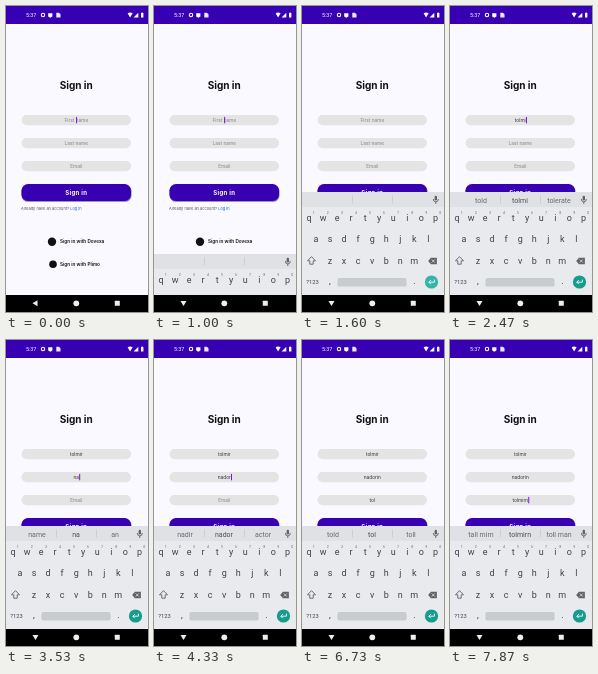
Animation, 142 px wide and 306 px high, one loop 8000 ms. Source, as an HTML page:

```html
<!DOCTYPE html>
<html lang="en">
<head>
<meta charset="utf-8">
<title>Sign in</title>
<style>
  html, body { margin: 0; width: 100%; height: 100%; overflow: hidden; background: #f9f9ff; }
  svg { display: block; width: 142px; height: 306px; }
  text { font-family: Inter, "Open Sans", sans-serif; text-anchor: middle; }
  .pill { fill: #e4e4e4; }
  .field { font-size: 4.8px; }
  .left { text-anchor: start; }
  .other { font-size: 4.7px; font-weight: 600; fill: #111; }
  .kb text { font-family: Roboto, sans-serif; fill: #3f4348; }
  .kb .key { font-size: 9px; }
  .kb .hint { font-size: 3.6px; fill: #6b6f74; }
  .kb .word { font-size: 7px; fill: #676b70; }
  .kb .mid { fill: #4b4f54; }
  .line { fill: none; stroke: #5f6368; stroke-width: .9; }
</style>
</head>
<body>
<svg viewBox="0 0 142 306">
  <rect width="142" height="306" fill="#f9f9ff"/>
  <rect width="142" height="18" fill="#3700b3"/>
  <g fill="#fff">
    <text x="20" y="11" class="left" style="font: 5.4px Roboto, sans-serif">5:37</text>
    <circle cx="37" cy="9" r="1.7" fill="none" stroke="#fff" stroke-width="1.1"/>
    <path d="M42.2 7.2h4.2v3.2l-2.1 1.3-2.1-1.3z"/>
    <path d="M50.3 6.8h2.6l1.6 1.5v3.2h-4.2z" opacity=".9"/>
    <path d="M121.6 7.2q2.5-1.6 5 0l-2.5 4.2z"/>
    <path d="M132.3 6.7v4.7h-4.7z"/>
    <path d="M135 7h.6v-.6h1.2V7h.6v4.5H135z"/>
  </g>

  <text x="70.2" y="83.2" font-size="10" font-weight="700" fill="#111">Sign in</text>
  <g id="fields"></g>

  <rect x="15.5" y="178.8" width="110" height="17" rx="6.5" fill="#1b0460" opacity=".55"/>
  <rect x="15.5" y="178" width="109.5" height="17" rx="6.5" fill="#3700b3"/>
  <text x="70.3" y="188.6" font-size="6" font-weight="700" letter-spacing=".3" fill="#fff">Sign in</text>
  <text x="15" y="204.2" class="left" font-size="3.95" fill="#555">Already have an account? <tspan fill="#1f5fd0">Log in</tspan></text>

  <circle cx="46" cy="235.8" r="4.2" fill="#111"/>
  <text x="54" y="237.4" class="left other">Sign in with Dovexa</text>
  <circle cx="47" cy="258.2" r="3.8" fill="#111"/>
  <text x="54" y="259.8" class="left other">Sign in with Plimo</text>

  <g id="kb" class="kb">
    <rect y="186" width="142" height="120" fill="#e8eaed"/>
    <rect y="186" width="142" height="15" fill="#dfe1e5"/>
    <path d="M50.5 189.5v8M90.5 189.5v8" stroke="#c3c6ca" stroke-width=".7"/>
    <g id="words"></g>
    <rect x="132.6" y="189.8" width="2.4" height="4.6" rx="1.2" fill="#5f6368"/>
    <path class="line" stroke-width=".7" d="M131.3 193q0 2.9 2.5 2.9t2.5-2.9M133.8 196v2"/>
    <g id="keys"></g>
    <path class="line" d="M9.5 250.6l-4 4.2h2.3v3.4h3.4v-3.4h2.3z" fill="#5f6368"/>
    <path d="M126.2 255l2.7-3.3h6v6.6h-6z" fill="#5f6368"/>
    <path d="M129.8 253.5l3 3m0-3l-3 3" stroke="#e8eaed" stroke-width=".8"/>
    <text x="10.5" y="278.4" font-size="5.8">?123</text>
    <text x="28" y="278.4" class="key">,</text>
    <rect x="35.5" y="272" width="69" height="8.6" rx="1.5" fill="#c9cccf"/>
    <text x="112.5" y="278.4" class="key">.</text>
    <circle id="enter" cx="129.5" cy="276" r="6.6"/>
    <path d="M132.4 273.6v2.6h-5.6m2-2l-2 2 2 2" fill="none" stroke="#fff" stroke-width=".9"/>
  </g>

  <rect y="289" width="142" height="17" fill="#000"/>
  <path id="back" fill="#eee"/>
  <circle cx="70.3" cy="297.3" r="2.9" fill="#eee"/>
  <rect x="108.8" y="294.8" width="5" height="5" rx=".4" fill="#eee"/>
</svg>
<script>
const LOOP = 8000;
const $ = id => document.getElementById(id);

function add(parent, tag, attrs, text = '') {
  const el = document.createElementNS('http://www.w3.org/2000/svg', tag);
  for (const k in attrs) el.setAttribute(k, attrs[k]);
  el.textContent = text;
  parent.append(el);
  return el;
}

// Each entry: the text and the time each letter lands.
const fields = [
  { y: 114, hint: 'First name', text: 'tolmir', keys: [1870, 2000, 2130, 2330, 2470, 2600] },
  { y: 137, hint: 'Last name', text: 'nadorin', keys: [3200, 3530, 3800, 4070, 4330, 4600, 4730] },
  { y: 160, hint: 'Email', text: 'tolmirn', keys: [5800, 6130, 6470, 7070, 7330, 7600, 7870] }
];
const focusSteps = [[0, 0], [2870, 1], [5000, 2]];
const slideSteps = [[0, 122], [930, 62], [1070, 22], [1200, 5], [1400, 0]];
const blinkOff = [[470, 800], [1600, 1870], [5200, 5530], [6730, 7070]];
const wordSteps = [
  [0, ''], [1870, 'the t to'], [2000, 'to too top'], [2130, 'told tol tolls'],
  [2330, 'told tolm tool'], [2470, 'told tolmi tolerate'], [2600, 'told tolmir tolerate'],
  [2870, ''], [3200, 'no n not'], [3530, 'name na an'], [3800, 'bad nad and'],
  [4070, 'nado nadir bad'], [4330, 'nadir nador actor'], [4600, 'nadori nadir major'],
  [4730, 'nadorin nadir doing'], [5000, ''], [5800, 'the t to'], [6130, 'to too top'],
  [6470, 'told tol toll'], [7070, 'told tolm tool'], [7330, 'told tolmi tolls'],
  [7600, 'tall_mir tolmir toll_me'], [7870, 'tall_mirn tolmirn toll_man']
];
const at = (steps, t) => steps.filter(s => s[0] <= t).pop()[1];

for (const f of fields) {
  add($('fields'), 'rect', { class: 'pill', x: 15.5, y: f.y - 5, width: 109.5, height: 10.2, rx: 5.1 });
  f.label = add($('fields'), 'text', { class: 'field', x: 70.3, y: f.y + 1.8 });
}
const caret = add($('fields'), 'rect', { width: .9, height: 6.4, fill: '#6a00d8' });

[['qwertyuiop', 7, 215.2], ['asdfghjkl', 14, 236.4], ['zxcvbnm', 28, 258.2]].forEach(([row, x, y], r) => {
  [...row].forEach((c, i) => {
    const cx = x + i * 14.05;
    add($('keys'), 'text', { class: 'key', x: cx, y }, c);
    if (!r) add($('keys'), 'text', { class: 'hint', x: cx + 4.8, y: 207.6 }, (i + 1) % 10);
  });
});
const words = [31, 70, 109].map((x, i) =>
  add($('words'), 'text', { class: i === 1 ? 'word mid' : 'word', x, y: 196.6 }));

function draw(t) {
  const focus = at(focusSteps, t);
  fields.forEach((f, i) => {
    const typed = f.text.slice(0, f.keys.filter(k => k <= t).length);
    f.label.textContent = typed || f.hint;
    f.label.setAttribute('fill', typed ? '#333' : '#858585');
    if (i === focus) {
      const half = typed ? f.label.getComputedTextLength() / 2 + .3 : 0;
      caret.setAttribute('x', 70.2 + half);
      caret.setAttribute('y', f.y - 3.1);
    }
  });
  caret.setAttribute('opacity', blinkOff.some(([a, b]) => t >= a && t < b) ? 0 : 1);

  const list = at(wordSteps, t).split(' ');
  words.forEach((w, i) => { w.textContent = (list[i] || '').replace('_', ' '); });

  $('kb').setAttribute('transform', `translate(0 ${at(slideSteps, t)})`);
  $('enter').setAttribute('fill', t < 1870 ? '#35b5a8' : '#169c8c');
  $('back').setAttribute('d', t < 800 ? 'M31.5 294.3v6l-5-3z' : 'M26.5 295h6l-3 5z');
}

function tick() {
  draw(performance.now() % LOOP);
  requestAnimationFrame(tick);
}
tick();
</script>
</body>
</html>
```
